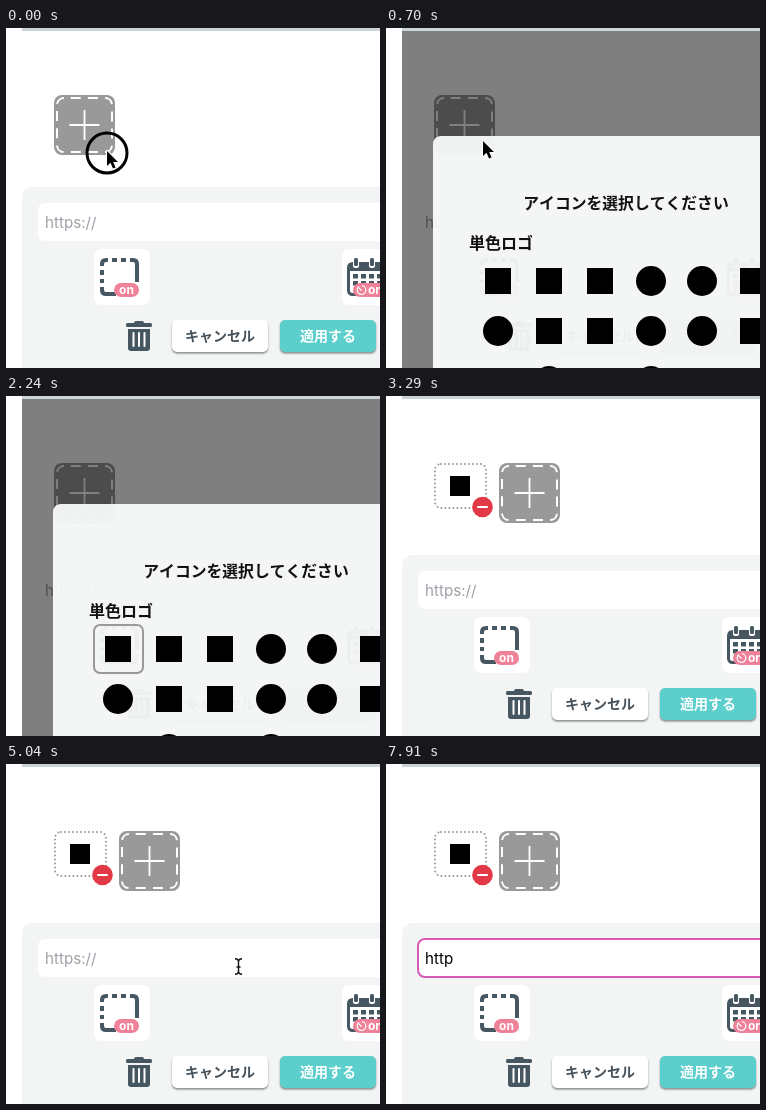
An HTML page with a canvas that plays this animation: 374x340 px, repeating every 8000 ms.

```html
<!DOCTYPE html>
<html lang="ja">
<head>
<meta charset="utf-8">
<style>
html, body { margin: 0; width: 100%; height: 100%; overflow: hidden; background: #fff; }
canvas { display: block; width: 374px; height: 340px; }
</style>
</head>
<body>
<canvas id="stage" width="374" height="340"></canvas>
<script>
const LOOP = 8000, TICK = 70;
const INK = '#465762', PINK = '#ef8198', GRAY = '#999';
const JP = '"Noto Sans CJK JP", "Noto Sans CJK", sans-serif';
const LATIN = 'Inter, "Liberation Sans", sans-serif';
const ctx = document.getElementById('stage').getContext('2d');

function box(x, y, w, h, r, fill) {
  ctx.beginPath();
  ctx.roundRect(x, y, w, h, r);
  ctx.fillStyle = fill;
  ctx.fill();
}

function outline(x, y, w, h, r, color, width, dash = [], offset = 0) {
  ctx.save();
  ctx.beginPath();
  ctx.roundRect(x, y, w, h, r);
  ctx.setLineDash(dash);
  ctx.lineDashOffset = offset;
  ctx.strokeStyle = color;
  ctx.lineWidth = width;
  ctx.stroke();
  ctx.restore();
}

function dotted(x, y, w, h) {
  ctx.lineCap = 'round';
  outline(x, y, w, h, 6, GRAY, 2, [0, 4]);
  ctx.lineCap = 'butt';
}

function disc(x, y, r, fill) {
  ctx.beginPath();
  ctx.arc(x, y, r, 0, Math.PI * 2);
  ctx.fillStyle = fill;
  ctx.fill();
}

function strokePath(d, color, width) {
  ctx.strokeStyle = color;
  ctx.lineWidth = width;
  ctx.stroke(new Path2D(d));
}

function label(str, x, y, font, color, align = 'left') {
  ctx.font = font;
  ctx.textAlign = align;
  ctx.fillStyle = color;
  ctx.fillText(str, x, y);
}

function addTile(x) {
  box(x, 67, 61, 60, 8, GRAY);
  outline(x + 3, 70, 55, 54, 7, '#fff', 2, [10, 7.2], 10.5);
  strokePath(`M${x + 15.5} 97h30M${x + 30.5} 82v30`, '#fff', 1.8);
}

function chosenTile() {
  dotted(49, 68, 51, 44);
  box(64, 80, 20, 20, 0, '#000');
  disc(96.5, 111, 10.3, '#e33946');
  box(91, 110, 11, 2, 1, '#fff');
}

function borderButton() {
  box(88, 221, 56, 56, 7, '#fff');
  strokePath('M96 238V236Q96 232 100 232H102M106 232h5M115 232h5M124 232H127Q131 232 131 236V254' +
    'M96 242v5M96 251v4M96 259V262Q96 266 100 266H110', INK, 4);
  box(108, 255, 25, 14, 7, PINK);
  label('on', 120.5, 266, 'bold 12px ' + LATIN, '#fff', 'center');
}

function calendarButton() {
  box(336, 221, 56, 56, 7, '#fff');
  outline(342.5, 235.5, 40, 31, 4, INK, 3);
  box(342, 235, 40, 8, [3, 3, 0, 0], INK);
  for (const x of [347, 363]) {
    box(x, 229, 6, 11, 2, '#fff');
    box(x + 1, 230, 4, 8, 1.5, INK);
  }
  for (let row = 0; row < 2; row++)
    for (let col = 0; col < 4; col++) box(347 + col * 8, 246 + row * 7, 5, 4.5, 0, INK);
  box(347, 255, 40, 14, 7, PINK);
  ctx.beginPath();
  ctx.arc(355.5, 262, 4.3, -1.5, 4.1);
  ctx.strokeStyle = '#fff';
  ctx.lineWidth = 1.3;
  ctx.stroke();
  strokePath('M353 260l2.5 2.5', '#fff', 1.3);
  label('on', 362, 266, 'bold 12px ' + LATIN, '#fff');
}

function trash() {
  box(128, 293, 10, 5, 2, INK);
  box(120, 295, 26, 4, 1.5, INK);
  box(122, 301, 22, 22, [0, 0, 3, 3], INK);
  for (const x of [126.5, 132, 137.5]) box(x, 304, 2, 15, 1, '#fff');
}

function button(x, str, fill, color) {
  ctx.save();
  ctx.shadowColor = 'rgba(0,0,0,.45)';
  ctx.shadowBlur = 2;
  ctx.shadowOffsetY = 1.5;
  box(x, 292, 96, 32, 5, fill);
  ctx.restore();
  label(str, x + 48, 313, 'bold 14px ' + JP, color, 'center');
}

function field(t) {
  const focused = t >= 5180;
  const typed = 'http'.slice(0, [6650, 7000, 7210, 7350].filter(at => t >= at).length);
  box(32, 175, 360, 38, 7, '#fff');
  if (focused) outline(32, 175, 360, 38, 7, '#d75bb5', 2);
  label(typed || 'https://', 39, 200, '15.2px ' + LATIN, typed ? '#000' : '#9da2a8');
  const caretOn = focused && !(t >= 5740 && t < 6230) && t < 7910;
  if (caretOn) {
    const x = 39 + (typed ? ctx.measureText(typed).width : 0);
    box(Math.floor(x), 185, 1, 18, 0, '#000');
  }
}

function page(t, dimmed) {
  box(0, 0, 374, 340, 0, '#fff');
  box(16, 0, 358, 3, 0, '#cbd5d9');
  if (!dimmed) box(16, 159, 400, 200, 10, '#f3f5f5');
  if (t >= 3290) {
    chosenTile();
    addTile(113);
  } else {
    addTile(48);
  }
  field(t);
  borderButton();
  calendarButton();
  trash();
  button(166, 'キャンセル', '#fff', '#46525b');
  button(274, '適用する', dimmed ? '#b0b0b0' : '#5ccfcd', '#fff');
}

// c: circle, s: square
const ICON_ROWS = ['sssccs', 'cssccs', ' cscss'];

function picker(t) {
  box(16, 3, 358, 337, 0, 'rgba(0,0,0,.5)');
  box(47, 108, 400, 300, 8, 'rgba(254,255,255,.92)');
  label('アイコンを選択してください', 240, 181, 'bold 15.8px ' + JP, '#111', 'center');
  label('単色ロゴ', 83, 221, 'bold 16px ' + JP, '#111');
  ICON_ROWS.forEach((row, j) => [...row].forEach((kind, i) => {
    const x = 112 + i * 51, y = 253 + j * 50;
    if (kind === 'c') disc(x, y, 15, '#000');
    if (kind === 's') box(x - 13, y - 13, 26, 26, 0, '#000');
  }));
  if (t >= 1820) outline(88, 229, 49, 48, 6, GRAY, 2);
  else if (t >= 1470) dotted(88, 229, 49, 48);
  else if (t >= 1260) dotted(139, 229, 49, 48);
}

const ARROW = new Path2D('M0 0V15L3.5 11.8L6 17.5L8.6 16.4L6.2 10.9H11Z');
const HAND = new Path2D('M-2 1Q0-1 2 1L3 6Q5 4.5 6 6.5Q8 5.5 9 7.5Q11 7 11 9V12L9 17H0L-5 11' +
  'Q-6 8-3 9L-1 10.5Z');

function pointer(x, y, scale, shape, fill, edge, width) {
  ctx.save();
  ctx.translate(x, y);
  ctx.scale(scale, scale);
  ctx.lineJoin = 'round';
  ctx.strokeStyle = edge;
  ctx.lineWidth = width;
  ctx.stroke(shape);
  ctx.fillStyle = fill;
  ctx.fill(shape);
  ctx.restore();
}

const arrow = (x, y) => pointer(x, y, 1, ARROW, '#000', '#fff', 2);

function hand(x, y) {
  pointer(x, y, 0.85, HAND, '#fff', '#000', 1.6);
  strokePath(`M${x + 2.5} ${y + 5}v4M${x + 5} ${y + 6}v3M${x + 7.5} ${y + 7}v2.5` +
    `M${x + 1} ${y + 10}v3M${x + 3.5} ${y + 10}v3M${x + 6} ${y + 10}v3`, '#000', 0.9);
}

const ibeam = () => strokePath('M229 194.8Q232.5 194.8 232.5 198V207Q232.5 210.2 229 210.2' +
  'M236 194.8Q232.5 194.8 232.5 198M232.5 207Q232.5 210.2 236 210.2M230.5 203h4', '#111', 1.4);

function ring(x, y, r) {
  ctx.beginPath();
  ctx.arc(x, y, r, 0, Math.PI * 2);
  ctx.strokeStyle = '#000';
  ctx.lineWidth = 3;
  ctx.stroke();
}

// [time, x, y]
const ROUTE = [
  [0, 101, 123], [140, 101, 123], [560, 97, 113], [840, 97, 113], [1050, 116, 150],
  [1190, 146, 215], [1330, 160, 239], [1400, 152, 247], [1540, 128, 259], [2030, 128, 259],
  [2170, 160, 301], [2240, 170, 320],
  [4060, 172, 332], [4270, 222, 270], [4410, 274, 206], [4550, 262, 219],
  [4690, 244, 234], [4830, 244, 234], [4970, 234, 206], [5040, 232, 202]
];

function place(t) {
  const i = ROUTE.findIndex(p => p[0] > t);
  if (i < 1) return ROUTE[ROUTE.length - 1].slice(1);
  const [t0, x0, y0] = ROUTE[i - 1], [t1, x1, y1] = ROUTE[i];
  const k = (t - t0) / (t1 - t0);
  return [x0 + (x1 - x0) * k, y0 + (y1 - y0) * k];
}

function cursor(t) {
  const [x, y] = place(t);
  if (t < 140) ring(101, 125, 20);
  if (t >= 1820 && t < 1960) ring(138, 268, 19);
  if (t >= 5180 && t < 5250) ring(232, 202, 15);
  if (t >= 1260 && t < 2100) hand(x, y);
  else if (t < 2240 || (t >= 4060 && t < 4970)) arrow(x, y);
  else if (t >= 4970 && t < 6650) ibeam();
}

function frame() {
  const now = performance.now() % LOOP;
  const t = Math.floor(now / TICK) * TICK;
  const picking = t >= 700 && t < 3290;
  page(t, picking);
  if (picking) picker(t);
  cursor(t);
  requestAnimationFrame(frame);
}
frame();
</script>
</body>
</html>
```
